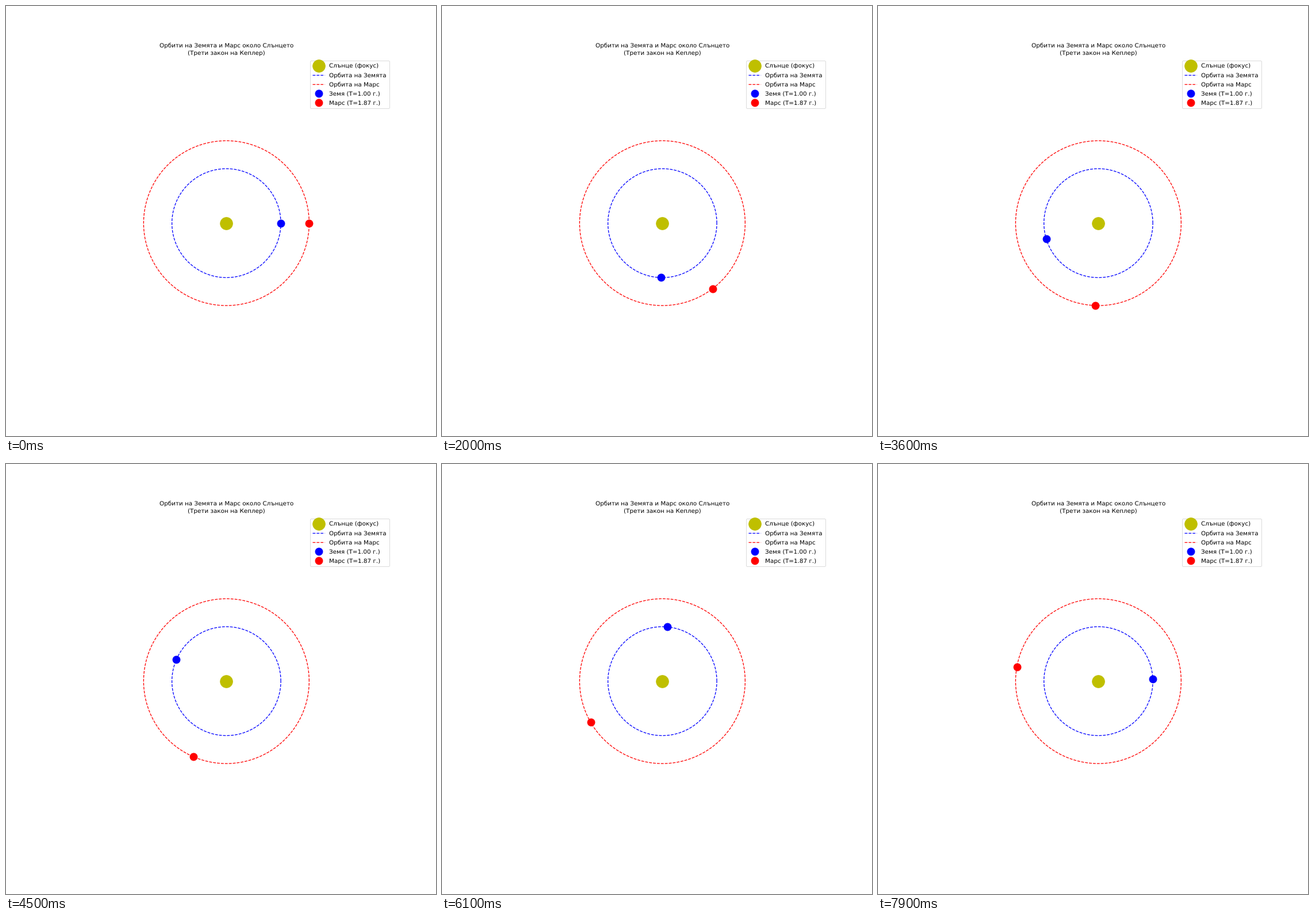
Animation of 748x748 px, one loop 8 s. Source, as a matplotlib script:

```python
import numpy as np
import matplotlib.pyplot as plt
from matplotlib.animation import FuncAnimation

plt.rcParams["text.hinting"] = "none"

FRAMES = 80
INTERVAL = 100
SIZE = 12
DPI = 748 / SIZE

# Semi-major axis (AU) and eccentricity
EARTH = (1.0, 0.0167)
MARS = (1.52, 0.0934)


def period(orbit):
    return orbit[0] ** 1.5


def point(orbit, E):
    a, e = orbit
    return a * np.cos(E), a * np.sqrt(1 - e**2) * np.sin(E)


def eccentric_anomaly(M, e):
    E = M
    for _ in range(20):
        E = E - (E - e * np.sin(E) - M) / (1 - e * np.cos(E))
    return E


def position(orbit, t):
    M = 2 * np.pi * t / period(orbit)
    x, y = point(orbit, eccentric_anomaly(M, orbit[1]))
    return x, -y


STEP = period(MARS) / 149  # years per frame

fig, ax = plt.subplots(figsize=(SIZE, SIZE), dpi=DPI)
lim = 2 * MARS[0]
ax.set_aspect("equal")
ax.axis("off")
ax.set_title("Орбити на Земята и Марс около Слънцето\n(Трети закон на Кеплер)",
             fontsize=12, linespacing=1.37)


def body(x, color, size, label):
    # A scatter point moves by fractions of a pixel, a line marker does not
    return ax.scatter([x], [0], s=size**2, color=color, linewidth=1,
                      zorder=3, label=label)


theta = np.linspace(0, 2 * np.pi, 500)
body(0, "y", 25, "Слънце (фокус)")
ax.plot(*point(EARTH, theta), "b--", label="Орбита на Земята")
ax.plot(*point(MARS, theta), "r--", label="Орбита на Марс")
earth = body(EARTH[0], "b", 15, f"Земя (T={period(EARTH):.2f} г.)")
mars = body(MARS[0], "r", 15, f"Марс (T={period(MARS):.2f} г.)")
ax.set_xlim(-lim, lim)
ax.set_ylim(-lim, lim)
ax.legend(loc="upper right", bbox_to_anchor=(1.001, 1), fontsize=12,
          labelspacing=0.61, borderpad=0.456,
          scatterpoints=1, scatteryoffsets=[0.5])


def update(i):
    for dot, orbit in ((earth, EARTH), (mars, MARS)):
        dot.set_offsets([position(orbit, i * STEP)])
    return earth, mars


anim = FuncAnimation(fig, update, frames=FRAMES, interval=INTERVAL,
                     repeat=True, repeat_delay=0)
plt.show()
```
